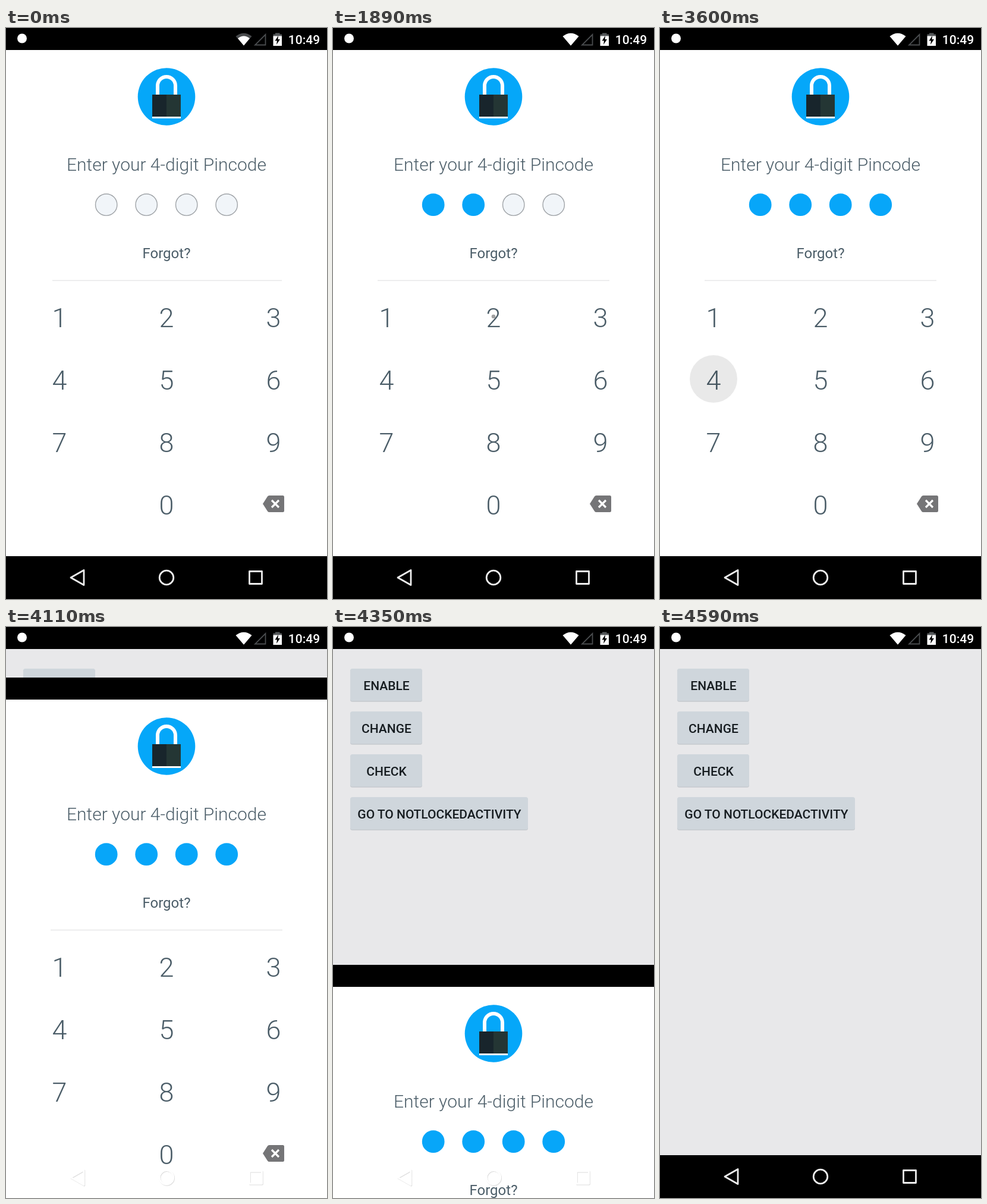
An HTML page for the animation above (5.59 s loop, 540 px wide and 960 px high).

```html
<!DOCTYPE html>
<html lang="en">
<head>
<meta charset="utf-8">
<title>Pincode unlock</title>
<style>
  html, body { margin: 0; width: 100%; height: 100%; overflow: hidden; background: #000; }
  svg { display: block; width: 100%; height: 100%; }
  text { font-family: Roboto, sans-serif; fill: #4b5d68; text-anchor: middle; }
  .light { font-weight: 300; }
  .button { font-weight: 500; font-size: 21px; fill: #161c20; }
</style>
</head>
<body>
<svg viewBox="0 0 540 960">
  <defs>
    <g id="navIcons" fill="none" stroke-width="2.8" stroke-linejoin="round">
      <path d="M109 924L131 911.5V936.5Z"/>
      <circle cx="270" cy="924" r="11.8"/>
      <rect x="409.5" y="913.5" width="21" height="21"/>
    </g>
  </defs>

  <g id="home">
    <rect width="540" height="888" fill="#e8e8ea"/>
    <rect y="888" width="540" height="72"/>
  </g>

  <g id="lockScreen">
    <rect width="540" height="37"/>
    <rect y="37" width="540" height="923" fill="#fff"/>
    <circle cx="270" cy="115.5" r="48.3" fill="#05a7f9"/>
    <path d="M255 113V97a15 15 0 0 1 30 0V113" fill="none" stroke="#fff" stroke-width="6"/>
    <path d="M246 112H270V149H246Z" fill="#18252c"/>
    <path d="M270 112H294V149H270Z" fill="#243634"/>
    <path d="M246 149H294V152H246Z" fill="#fff"/>
    <text class="light" x="270" y="240" font-size="30">Enter your 4-digit Pincode</text>
    <g id="dots"></g>
    <text x="270" y="387" font-size="24">Forgot?</text>
    <path id="divider" stroke="#e6e7e8" stroke-width="1.4"/>
    <g id="keys" class="light" font-size="45"></g>
    <path d="M432 800L440 787.5Q441 786 443 786H465.500Q468 786 468 788.500V811.500Q468 814 465.500 814H443Q441 814 440 812.500Z" fill="#757577"/>
    <path d="M447 794L459 806M459 794L447 806" stroke="#fff" stroke-width="3.2"/>
    <circle id="ripple"/>
  </g>

  <rect width="540" height="37"/>
  <circle cx="27" cy="17.5" r="8" fill="#fff"/>
  <path id="wifiBack" d="M386.500 14Q400 3.500 413.500 14L400 29.500Z"/>
  <path d="M390 17.500Q400 9.500 410 17.500L400 29.500Z" fill="#fff"/>
  <path d="M436.500 11V28.500H419Z" fill="none" stroke="#4a4d4f" stroke-width="1.8"/>
  <path d="M453 8.500H460.500V10.500H464V14H449.500V10.500H453Z" fill="#55585a"/>
  <path d="M449.500 13.500H464V30H449.500Z" fill="#fff"/>
  <path d="M458 13L452.500 21.500H456L455 28L461 19H457.500Z"/>
  <text x="501.5" y="27" font-size="21" font-weight="500" style="fill:#fff">10:49</text>

  <rect id="navBar" y="888" width="540" height="72"/>
  <use id="navShadow" href="#navIcons" x=".8" y="2.5" stroke="#dcdcdc"/>
  <use id="navFront" href="#navIcons"/>
</svg>

<script>
const LOOP = 5590, STEP = 30;
const presses = [
  { at: 1230, x: 90, y: 485 },
  { at: 1860, x: 270, y: 485 },
  { at: 2430, x: 450, y: 485 },
  { at: 3240, x: 90, y: 590 }
];
const RIPPLE_TIME = 420;
const SETTLE_AT = 1440;
const EXIT_AT = 3810, SLIDE_AT = 3984, SLIDE_TIME = 655, EXIT_END = 4590;

const $ = id => document.getElementById(id);
const clamp = v => Math.max(0, Math.min(1, v));

function set(node, attributes) {
  for (const name in attributes) node.setAttribute(name, attributes[name]);
}

function add(parent, tag, attributes, content = '') {
  const node = document.createElementNS('http://www.w3.org/2000/svg', tag);
  set(node, attributes);
  node.textContent = content;
  return parent.appendChild(node);
}

['ENABLE', 'CHANGE', 'CHECK', 'GO TO NOTLOCKEDACTIVITY'].forEach((label, i) => {
  const y = 70 + i * 72, width = i < 3 ? 121 : 299;
  const box = { x: 29, width, height: 54.5, rx: 3.5 };
  add($('home'), 'rect', { ...box, y: y + 1.2, fill: '#c4c8cc' });
  add($('home'), 'rect', { ...box, y, fill: '#cfd6dc' });
  add($('home'), 'text', { x: 29.5 + width / 2, y: y + 36, class: 'button' }, label);
});

[...'123456789', '', '0'].forEach((digit, i) =>
  add($('keys'), 'text', { x: 90 + i % 3 * 180, y: 503 + Math.floor(i / 3) * 105 }, digit));

const dots = presses.map((_, i) =>
  add($('dots'), 'circle', { cx: 168.7 + i * 67.5, cy: 297.2, r: 18.2, 'stroke-width': 1.4 }));

function render(t) {
  dots.forEach((dot, i) => {
    const filled = t >= presses[i].at;
    set(dot, { fill: filled ? '#07a6f9' : '#f1f5f9', stroke: filled ? '#07a6f9' : '#a0a4a8' });
  });

  const press = presses.find(p => t >= p.at && t < p.at + RIPPLE_TIME);
  const age = press ? t - press.at : 0;
  set($('ripple'), {
    cx: press ? press.x : 0,
    cy: press ? press.y : 0,
    r: Math.min(40.3, age / 9),
    'fill-opacity': 0.39 * (1 - age / 460)
  });

  const settled = t >= SETTLE_AT;
  set($('wifiBack'), { fill: settled ? '#fff' : '#484a4c' });
  set($('divider'), { d: settled ? 'M75 424.500H465' : 'M78 424.500H464' });

  // The closing window slides down with an accelerate-decelerate curve.
  const slide = (1 - Math.cos(Math.PI * clamp((t - SLIDE_AT) / SLIDE_TIME))) / 2;
  const offset = Math.round(slide * 960);
  const exiting = t >= EXIT_AT && t < EXIT_END;
  set($('lockScreen'), {
    transform: `translate(0 ${offset})`,
    visibility: t < EXIT_END ? 'visible' : 'hidden'
  });
  set($('navBar'), { opacity: exiting ? 1 - clamp((t - EXIT_AT) / 180) : 1 });
  set($('navShadow'), { visibility: exiting && offset < 888 ? 'visible' : 'hidden' });
  set($('navFront'), { stroke: exiting ? '#fff' : '#eee', y: exiting ? 1.5 : 0 });
}

// The picture advances in whole steps, like a screen recording.
const start = performance.now();
function tick() {
  const t = (performance.now() - start) % LOOP;
  render(Math.floor(t / STEP) * STEP);
  requestAnimationFrame(tick);
}
tick();
</script>
</body>
</html>
```
